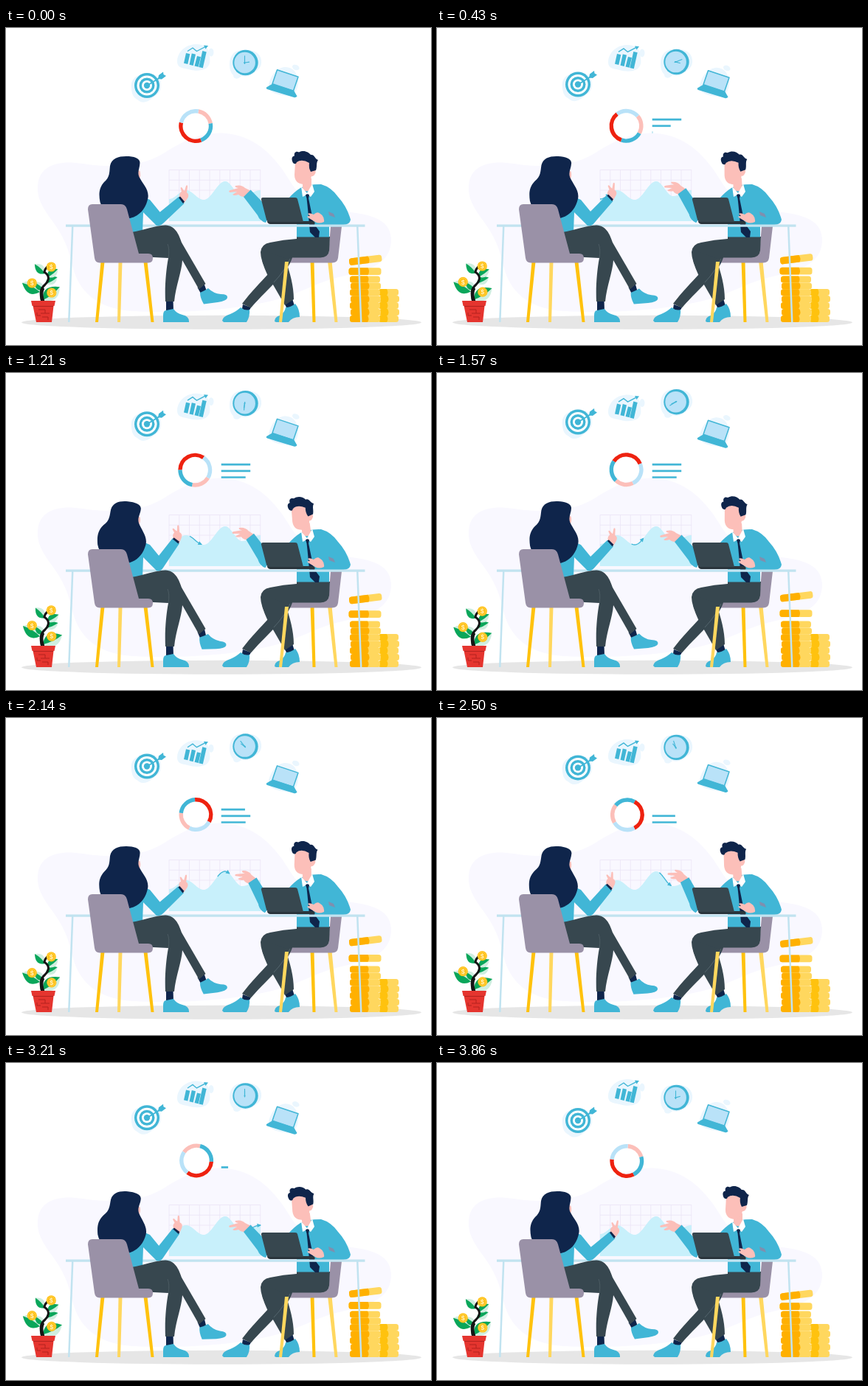
Recreate the animation shown at these times as an HTML page. Size 576 by 430 pixels, loop 3930 ms.

```html
<!DOCTYPE html>
<html lang="en">
<head>
<meta charset="utf-8">
<title>Business meeting</title>
<style>
html,body{margin:0;width:100%;height:100%;overflow:hidden;background:#fff}
svg{display:block;width:100vw;height:100vh}
.t{fill:#41b6d6}.n{fill:#0f254b}.s{fill:#fcbfb9}.p{fill:#37474f}.g{fill:#9a91a7}
.y{fill:#ffc20e}.l{fill:#ffd75e}.h{fill:#eaf6fe}.b{fill:#b9e2f8}
.o{fill:none;stroke:#41b6d6}
text{font:700 9px Arial,"Liberation Sans",sans-serif;text-anchor:middle;fill:#fff3c4}
</style>
</head>
<body>
<svg viewBox="0 0 576 430">
<path fill="#f9f8ff" d="M43 214C45 185 72 179 104 184C150 191 184 187 212 171C238 154 262 142 292 142.500C330 144 354 164 374 191C393 220 405 243 438 247C478 251 521 252 522 287C522 323 486 330 451 338C414 347 396 363 352 372C298 384 225 387 172 384C122 381 99 356 91 326C84 294 75 278 60 258C47 240 42 229 43 214Z"/>
<ellipse cx="292" cy="399.3" rx="271" ry="9.5" fill="#e6e6e6"/>
<path id="grid" fill="none" stroke="#ebe5f7" stroke-width=".8"/>
<path id="area" fill="#c8f0fb"/>
<g id="arrow"><path id="tail" class="o" stroke-width="1.3"/><path id="tip" class="t" d="M1 0L-4.5-2.7V2.7Z"/></g>

<!-- floating icons -->
<g id="target">
 <path class="h" d="M170 83C168 72 174 65 184 63C197 59 209 64 210 76C211 88 203 91 197 96C190 102 183 102 178 97C172 94 171 90 170 83Z"/>
 <circle cx="191" cy="78" r="17" class="t"/><circle cx="191" cy="78" r="13.5" fill="#fff"/>
 <circle cx="191" cy="78" r="10.5" class="t"/><circle cx="191" cy="78" r="7" fill="#fff"/>
 <circle cx="191" cy="78" r="4.2" class="t"/>
 <path class="o" stroke-width="1.8" d="M190.5 78.5L210 66.5"/>
 <path class="t" d="M206 69L207 64L213 59.5L213.5 63L217 65L211 69.5Z"/>
</g>
<g id="bars">
 <path class="h" d="M232 45C232 35 240 25 251 23C262 20 274 24 275 33C276 41 279 49 271 55C261 60 251 57 243 55C235 54 232 51 232 45Z"/>
 <ellipse cx="278" cy="33" rx="3.5" ry="5.5" class="h"/>
 <g class="t"><path d="M244 34L249.300 35.300L246.300 49L241 47.800Z"/><path d="M251.800 34.500L257 35.800L253.700 51L248.500 49.700Z"/><path d="M259 38L264 39.200L260.700 52.700L255.500 51.500Z"/><path d="M266.300 31L271.700 32.400L266.800 54.300L261.300 53Z"/></g>
 <path class="o" stroke-width="1.4" d="M246 31.5L253 27L258.500 31.500L271 25"/>
 <path class="t" d="M274 24L268 23.500L270.500 28.500Z"/>
</g>
<g id="clock">
 <path class="h" d="M303 49C303 38 309 30 320 30C331 28 345 32 346 44C347 54 341 57 336 61C330 65 325 67 319 65C315 70 308 70 308 64C304 60 303 55 303 49Z"/>
 <circle cx="324.5" cy="47" r="17.200" class="t"/><circle cx="323.600" cy="47" r="14.300" class="b"/>
 <path id="minute" class="o" stroke-width="1.1" d="M323.500 49V37.500"/>
 <path id="hour" class="o" stroke-width="1.1" d="M323.500 48.500V40.500"/>
 <circle cx="323.500" cy="47" r="1" class="t"/>
</g>
<g id="pc">
 <path class="h" d="M356 77C358 68 364 55 377 53C389 52 395 61 396 72C396 84 391 93 380 92C368 91 354 87 356 77Z"/>
 <ellipse cx="393" cy="53.500" rx="5" ry="3.500" transform="rotate(25 393 53)" class="h"/>
 <path class="b" stroke="#41b6d6" stroke-width="1.500" stroke-linejoin="round" d="M367.500 56.800L396 66.300L389.500 85.300L361 75.800Z"/>
 <path class="t" d="M361 75.800L390 84.800L394.500 92.500Q393 95 390 94L354 83Q352 82 353 80.500Z"/>
</g>
<g id="donut" fill="none" stroke-width="5.400"></g>
<g id="lines" stroke="#41b6d6" stroke-width="2.700"></g>

<!-- potted plant -->
<g id="leaves"></g>
<path d="M49 372C46 360 46 354 53 348C60 341 58 335 52 331C53 325 56 324 59 322" fill="none" stroke="#151515" stroke-width="3"/>
<path d="M47.500 372C45.500 363 46 356 50 351L52 354C49 360 51 366 53 372Z" fill="#151515"/>
<g id="money"></g>
<path fill="#e5352f" d="M34 370H67L65.500 377H64.500L62 399H41L36.500 377H35.500Z"/>
<path d="M37 377.500H64M44 382H53V387H47M53 387H59M49 392H57V396M42 386V390H47" fill="none" stroke="#b3231f" stroke-width="1"/>

<!-- coin stacks -->
<g id="stack"></g>

<!-- man -->
<path class="y" d="M412.500 316H417.500L419.500 399H415.500Z"/>
<path class="l" d="M436 316H441.500L449.500 399H445.500Z"/>
<path class="g" d="M440 269H455L450 312Q449 318.500 442 318.500H384Q378 318 379 309L437 306Z"/>
<path class="n" d="M321 375L332 379L328 386H319Z"/>
<path class="t" d="M293 397Q294 391 304 388Q313 384 318 379Q324 384 330 382Q331 391 326 399H295Z"/>
<path class="n" d="M377 373L388 367L391 377L381 381Z"/>
<path class="t" d="M364 398Q364 392 371 390Q378 386 379 379Q386 379 392 374Q398 381 398 392Q388 392 383 399H366Z"/>
<path class="p" d="M394 283H439L438 302Q437 311 426 311.500H388C381 333 358 350 332 379.500L320 374C332 358 345 345 355 334Q345 316 345 304Q346 293 358 291Q376 287 394 286Z"/>
<path class="p" d="M346 300C345 318 354 336 363 350L378 376L390 368C390 350 385 332 378 312Z"/>
<path fill="none" stroke="#61737b" stroke-width=".7" d="M385 313Q378 329 363 345"/>
<path class="l" d="M378 317H383L374 399H370Z"/>
<path class="t" d="M399 217Q407 212 427 212Q441 216 450 229Q462 242 467 260Q466 267 457 267H438V283.500H394V262L372 246L383 231Q391 222 399 217Z"/>
<g id="head">
 <path class="s" d="M402 204H414V219Q409 224 402 219Z"/>
 <path class="s" d="M392 182Q403 176 414 184L415 191.500Q420.500 191 419.500 196.500Q417 202 414 201Q413 211 403 212Q391 211 391 199Z"/>
 <path class="n" d="M389 183C386 177 388 173.500 391 173.500C390 169 393 166.500 397 168.500C404 165 410 168.500 413 172C418 171 418 177 423 179C420 183 422 188 420 193L413 195Q410 190 411 183Q401 177 394 182Q393 186 389 183Z"/>
</g>
<path fill="#fff" d="M400 215L408 224L415 211.500L418 222L413 229L408 226L402 229Z"/>
<path class="n" d="M406 226.500Q408.500 224 411 226.500L410 231L417 265L425 276L424 284H419L412 277L408.500 240L407.500 231Z"/>
<g id="point">
 <path class="s" d="M332 221L324 217Q319 212 311 214Q309 216 315 217L304 220Q301 221 303 223L313 222L307 226Q309 228 315 226Q319 230 324 229Z"/>
 <path class="t" d="M322 229L331.500 219.500L360 249L352 264Q344 262 341 254Z"/>
</g>
<path fill="#2a353c" d="M354 262H416Q419 262 418.500 266H358Q354 265 354 262Z"/>
<path class="p" d="M348 230H392Q394.500 230 395 232L403 263H357Q354 263 353 260L346 233Q345.500 230 348 230Z"/>
<path class="s" d="M431 263Q424 266 419 263L409 257Q407 255 412 255L409 252Q411 250 417 253Q422 248 426 252Q432 256 431 263Z"/>
<path d="M437 249L444 252L446 257L438 254Z" fill="#7f8fae"/>

<path fill="#c1e3f0" d="M81 266.400H486.500V269.800H81ZM89 269H91.500L86.500 399H84ZM475 269H477.500L482.500 399H480Z"/>

<!-- woman -->
<path class="t" d="M160 237L188 230L195 233L213 255Q213 268 204 268L186 250L185 277H160Z"/>
<g id="hair"><path class="s" d="M178 192L181.500 194Q183.500 201 180 206Z"/>
<path class="n" d="M141 187C143 177 152 174 163 174C173 174 181.500 176.500 181.500 182.500C181.500 190 177.500 195 180.500 202C185 211 194 219 192.500 230C190 245 181 255 168 258C150 260 132 252 127.500 236C125.500 225 126 217 133 209C141 202 140 196 141 187Z"/></g>
<g id="foot">
 <path class="n" d="M259.500 352L268.500 347L272 357L264 360Z"/>
 <path class="t" d="M263 359Q270 356 274 353Q281 360 291 361Q301 361 300 366Q299 370 287 372L268 374.500Q263 366 263 359Z"/>
</g>
<path class="n" d="M217 369H226.500L227 385H217Z"/>
<path class="t" d="M213 399V390Q213 383 217 383L227 381Q231 387 239 389Q248 391 248 398V399Z"/>
<path class="p" d="M170 277C189 274 201 268 216 267.500C229 268 234 279 238 291L270.500 347L261.500 354.500L239 315C238 331 230 350 228 371H216C215 350 217 328 220 312L180 310Z"/>
<path fill="none" stroke="#53636b" stroke-width=".7" d="M220 312Q222 300 219 293"/>
<g id="reach">
 <path class="s" d="M235 231Q234 224 238 222L236.500 217Q238 214.500 240 219L242 221L244 214Q246.500 212 246 216L245 223Q249 226 246 231L241 238Z"/>
 <path class="t" d="M203 267Q208 270 213 265L241.500 238L234 229L207 251Q201 258 203 267Z"/>
 <path class="n" d="M234 230L236 228.500L242 235.500L240 238Z"/>
</g>
<path class="y" d="M128.500 317H133.500L125 399H121ZM186.500 317H191.500L200.500 399H196.500Z"/>
<path class="l" d="M152.500 317H157.500L155 399H151Z"/>
<path class="g" d="M117 239H156Q162 239 164 246L180 306H193Q199 306 199 312Q199 318.500 193 318.500H127Q121 318.500 120 312L111 246Q111 239 117 239Z"/>
</svg>
<script>
const NS = 'http://www.w3.org/2000/svg', LOOP = 3930, TAU = Math.PI * 2;
const $ = id => document.getElementById(id);
function add(parent, tag, attrs) {
  const e = document.createElementNS(NS, tag);
  for (const k in attrs) e.setAttribute(k, attrs[k]);
  return parent.appendChild(e);
}
const tf = (e, v) => e.setAttribute('transform', v);
const rot = (id, a, x, y) => tf($(id), `rotate(${a} ${x} ${y})`);
const lift = (e, y) => tf(e, `translate(0 ${y})`);
const clamp = v => Math.max(0, Math.min(1, v));
const ease = v => (1 - Math.cos(Math.PI * clamp(v))) / 2;

// chart
const knots = [[221, 232], [244, 220], [268, 233], [297, 208], [320, 228], [345, 220]];
function curveY(x) {
  let i = 0;
  while (i < knots.length - 2 && x > knots[i + 1][0]) i++;
  const [x0, y0] = knots[i], [x1, y1] = knots[i + 1];
  return y0 + (y1 - y0) * ease((x - x0) / (x1 - x0));
}
function curve(a, b) {
  let d = '';
  for (let x = a; x < b; x++) d += `${d ? 'L' : 'M'}${x} ${curveY(x)}`;
  return d + `${d ? 'L' : 'M'}${b} ${curveY(b)}`;
}
$('area').setAttribute('d', curve(221, 345) + 'V262H221Z');
let grid = '';
for (let i = 0; i < 10; i++) grid += `M${221 + i * 13.75} 192.500V262`;
for (let i = 0; i < 6; i++) grid += `M221 ${192.5 + i * 13.75}H345`;
$('grid').setAttribute('d', grid);

// donut: start and end angle, clockwise from the top
for (const [a, b, c] of [[10, 80, '#fcbfb9'], [80, 160, '#41b6d6'], [160, 283, '#ee2210'], [283, 370, '#b9e2f8']]) {
  const pt = v => `${257.2 + 20.3 * Math.sin(v * TAU / 360)} ${133 - 20.3 * Math.cos(v * TAU / 360)}`;
  add($('donut'), 'path', {d: `M${pt(a)}A20.3 20.3 0 0 1 ${pt(b)}`, stroke: c});
}

// text lines: y, length, grow start and end, shrink start and end
const rows = [[124.1, 39.5, 60, 400, 2000, 2500], [132.8, 39.5, 220, 580, 2300, 2960], [141.5, 33, 400, 760, 2800, 3440]]
  .map(r => [add($('lines'), 'line', {x1: 291.7, y1: r[0], y2: r[0]}), ...r]);

// leaves: base, angle, length, swing
const leaves = [[46, 358, 207, 27, 5], [53, 333, 222, 19, 5], [52, 355, 215, 17, 4], [50, 369, -38, 29, 14],
  [54, 347, -30, 18, 8], [56, 338, -38, 18, 8]].map(([x, y, a, n, w]) => {
  const g = add($('leaves'), 'g', {}), r = n * .38;
  add(g, 'path', {d: `M0 0Q${n * .4} ${-r * 1.6} ${n} 0Q${n * .5} ${r * 1.6} 0 0Z`, fill: '#cfeee0'});
  add(g, 'path', {d: `M0 0Q${n * .4} ${-r * 1.6} ${n} 0Q${n * .5} ${r * .3} 0 0Z`, fill: '#0aa65a'});
  return {g, x, y, a, w};
});
const money = [[61.3, 324, 2.5], [35.3, 346, 4], [61.8, 359, 2]].map(([x, y, w]) => {
  const g = add($('money'), 'g', {});
  add(g, 'circle', {cx: x, cy: y, r: 6.6, fill: '#ffbf12'});
  add(g, 'circle', {cx: x, cy: y, r: 5, fill: 'none', stroke: '#ffd75e', 'stroke-width': .8});
  add(g, 'text', {x, y: y + 3.2}).textContent = '$';
  return {g, w};
});

// coins
function coin(x, y, w, h, split, dark) {
  const g = add($('stack'), 'g', {});
  add(g, 'rect', {x, y, width: w, height: h, rx: 3.5, fill: '#ffd75e'});
  add(g, 'path', {d: `M${x + 3.5} ${y}H${x + split}q3 ${h / 2} 0 ${h}H${x + 3.5}q-3.500 0-3.500-3.500V${y + 3.5}q0-3.500 3.500-3.500`, fill: dark});
  return g;
}
for (let i = 0; i < 5; i++) coin(505 + i % 2, 354 + i * 9, 27, 9.1, 11, '#ffc20e');
for (let i = 0; i < 7; i++) coin(466 + i % 2, 336.5 + i * 8.9, 41, 9, 24, '#ffb000');
const second = coin(464.5, 325.2, 44, 9.8, 26, '#ffb000');
const top1 = coin(465, 310, 44.5, 9.6, 26, '#ffb000');

// keyed value: [time, value] pairs
function keyed(keys, t, f) {
  let i = 0;
  while (i < keys.length - 2 && t > keys[i + 1][0]) i++;
  const [a, u] = keys[i], [b, v] = keys[i + 1];
  return u + (v - u) * f((t - a) / (b - a));
}
const minuteKeys = [[0, 0], [790, 125], [1570, 238], [2140, 322], [2790, 358], [3210, 360], [LOOP, 360]];
const hourKeys = [[0, 82], [790, 125], [1570, 245], [2140, 305], [2790, 335], [3210, 360], [LOOP, 442]];
const pointKeys = [[0, 0], [790, 1], [1570, 0], [2400, 1], [3150, 0], [LOOP, 0]];

function draw(t) {
  const turn = t / LOOP, c = Math.cos(turn * TAU), lean = (1 - Math.cos(turn * 2 * TAU)) / 2;

  lift($('target'), 6.4 * (c - 1));
  lift($('clock'), 4.3 * (c - 1));
  lift($('bars'), 4.2 * (1 - c));
  lift($('pc'), 4.1 * (1 - c));
  rot('minute', keyed(minuteKeys, t, clamp), 323.5, 47);
  rot('hour', keyed(hourKeys, t, clamp), 323.5, 47);
  rot('donut', turn * 360, 257.2, 132);
  for (const [e, , len, a, b, p, q] of rows) {
    const n = len * ease((t - a) / (b - a)) * (1 - ease((t - p) / (q - p)));
    e.setAttribute('x2', 291.7 + n);
    e.style.display = n > .1 ? '' : 'none';
  }

  const x = 248 + (t - 790) * .0405, end = Math.min(x, 345), start = Math.max(221, x - 16);
  $('arrow').style.display = x > 222 && start < 345 && x < 348 ? '' : 'none';
  if (start < end) {
    $('tail').setAttribute('d', curve(start, end));
    const a = Math.atan2(curveY(end) - curveY(end - 3), 3) * 360 / TAU;
    tf($('tip'), `translate(${end} ${curveY(end)}) rotate(${a})`);
  }

  rot('hair', 6 * lean, 162, 198);
  rot('reach', -14.5 * lean, 208, 264);
  rot('foot', 7 * lean, 265, 352);
  rot('head', -9 * lean, 407, 221);
  rot('point', 14.7 * keyed(pointKeys, t, ease), 350, 258);

  for (const l of leaves) tf(l.g, `translate(${l.x} ${l.y - lean}) rotate(${l.a + l.w * lean})`);
  for (const m of money) lift(m.g, -m.w * lean);
  lift(second, 2.2 * (c - 1));
  tf(top1, `translate(0 ${6.4 * (c - 1)}) rotate(-7 487 315)`);
}
const begin = performance.now();
function tick() {
  draw((performance.now() - begin) % LOOP);
  requestAnimationFrame(tick);
}
tick();
</script>
</body>
</html>
```
